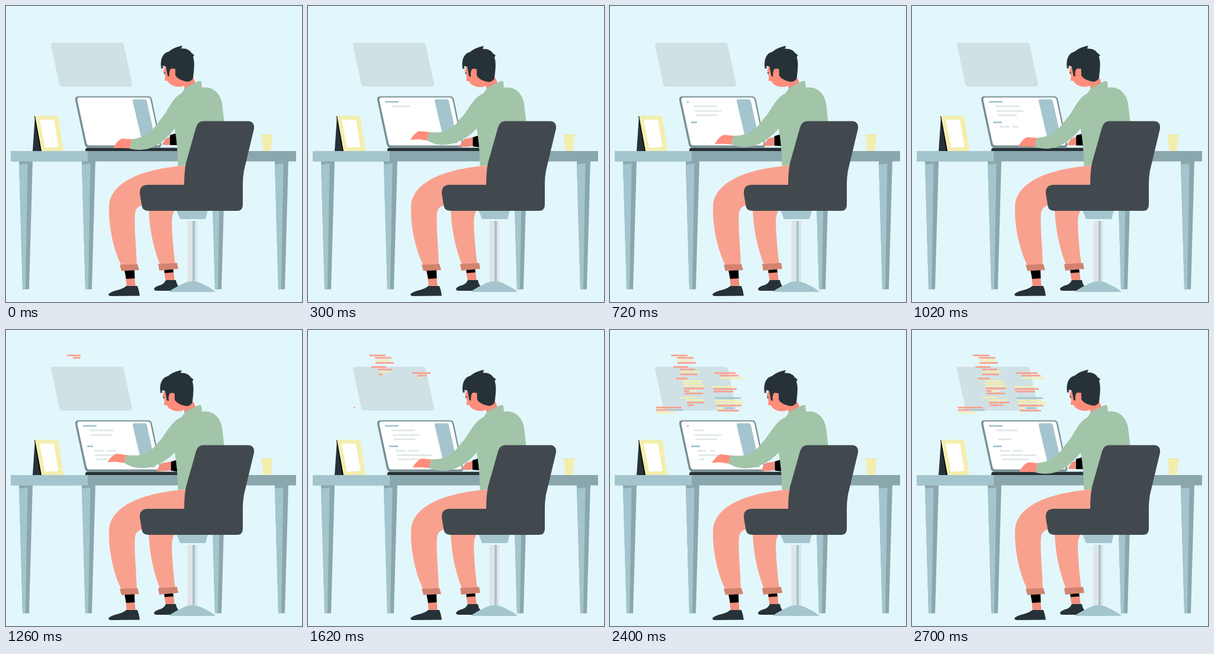
Write an HTML page with a canvas that moves like this. It is 500 by 500 pixels and loops after 2.73 s.

```html
<!DOCTYPE html>
<html lang="en">
<head>
<meta charset="utf-8">
<title>Working at a desk</title>
<style>
html, body { margin: 0; width: 100%; height: 100%; overflow: hidden; background: #e2f7fb; }
canvas { display: block; width: 500px; height: 500px; }
</style>
</head>
<body>
<canvas id="stage" width="500" height="500"></canvas>
<script>
const ctx = document.getElementById('stage').getContext('2d');
const LOOP = 2730;
const BLUE = '#a4c5cd', SLATE = '#8ba7ae', DARK = '#263238', CHAIR = '#41494e',
  SKIN = '#ff8d7b', SHADE = '#f28d7c', TROUSER = '#f9a18f', CUFF = '#d2836f',
  SAGE = '#a2c4a9', YELLOW = '#f4eeae', GREY = '#e0e8ea';
const inks = { p: TROUSER, y: YELLOW, b: BLUE };

const clamp = v => Math.max(0, Math.min(1, v));

function fill(color, d) {
  ctx.fillStyle = color;
  ctx.fill(new Path2D(d));
}

// Blend two paths that share the same commands.
function mix(a, b, u) {
  const target = b.match(/-?[\d.]+/g);
  let i = 0;
  return a.replace(/-?[\d.]+/g, n => +n + (target[i++] - n) * u);
}

// Linear interpolation over [time, value, time, value, ...].
function track(keys, t) {
  if (t <= keys[0]) return keys[1];
  for (let i = 2; i < keys.length; i += 2) {
    if (t < keys[i]) {
      const k = (t - keys[i - 2]) / (keys[i] - keys[i - 2]);
      return keys[i - 1] + (keys[i + 1] - keys[i - 1]) * k;
    }
  }
  return keys[keys.length - 1];
}

// Lines on the laptop: x, y, width, colour, growth keys
const screenLines = [
  [130, 162, 23, BLUE, [0, 0, 240, 1, 540, 1, 720, .12, 900, 1, 2220, 1, 2400, .12, 2600, 1]],
  [141, 169.5, 40, GREY, [120, 0, 350, 1, 2250, 1, 2400, .42, 2700, .94]],
  [143, 177.5, 45, GREY, [300, 0, 500, 1, 1100, 1, 1260, .78, 1450, 1, 1750, 1, 1950, .12, 2150, 1, 2420, 1, 2620, 0]],
  [145, 184.5, 36, GREY, [400, 0, 600, 1, 1000, 1, 1200, 0, 1300, 0, 1500, 1, 1800, 1, 1950, .42, 2100, 1, 2550, 1, 2700, .67]],
  [137, 196.5, 15, BLUE, [600, 0, 720, .67, 800, 1, 1150, 1, 1260, .67, 1400, 1]],
  [148, 204, 17, GREY, [800, 0, 1000, 1, 2300, 1, 2400, .88, 2500, 1]],
  [169.5, 204, 17.5, GREY, [900, 0, 1100, 1, 2250, 1, 2400, .47, 2550, 1]],
  [150, 211.5, 60, GREY, [1100, 0, 1260, .58, 1400, 1, 2250, 1, 2400, .62, 2550, 1]],
  [152, 218.5, 45, GREY, [1180, 0, 1260, .44, 1400, 1, 2200, 1, 2400, .15, 2600, 1]]
];

// Floating code: rows of y, x, then segments of ink and width
const blocks = [
  { start: 1110, rows: [
    [43, 103, 'p28'], [47, 113, 'p28'], [51, 114, 'y25'], [55.5, 114, 'p31'],
    [62.5, 107, 'p25'], [66.7, 118, 'p10 p15'], [71, 120, 'y31'], [75, 119, 'p28'],
    [82, 111, 'p20'], [86.3, 123, 'y33'], [90.5, 123, 'y16 y15'], [94.5, 124, 'y36'],
    [98.7, 124, 'p35'], [103, 125, 'p9 y12'], [107.2, 126, 'p31'], [114, 118, 'y25'],
    [118.3, 129, 'y31'], [122.6, 130, 'p17 p17'], [127, 131, 'p23']] },
  { start: 1463, rows: [
    [72.7, 176, 'p36'], [77, 185, 'p32'], [81.3, 186, 'y39'], [95.7, 173, 'y18 y15'],
    [99.7, 174, 'p40'], [104, 175, 'p33'], [115, 177, 'b44'], [119.2, 178, 'y19 y21'],
    [123.5, 178, 'y49'], [127.7, 180, 'p42'], [132, 181, 'y11 b16'], [136.2, 182, 'p36']] },
  { start: 1610, rows: [[131, 77, 'p43'], [135.2, 78, 'p21 b23'], [139.5, 79, 'y30']] }
];

function drawCode(t) {
  for (const { start, rows } of blocks) {
    rows.forEach(([y, x, text], i) => {
      const parts = text.split(' ').map(s => [inks[s[0]], +s.slice(1)]);
      const total = parts.reduce((sum, part) => sum + part[1] + 1, -1);
      let left = total * clamp((t - start - i * 67) / 185);
      for (const [ink, width] of parts) {
        ctx.fillStyle = ink;
        ctx.fillRect(x, y - 1.4, Math.max(0, Math.min(width, left)), 2.8);
        x += width + 1;
        left -= width + 1;
      }
    });
  }
}

function drawDesk() {
  for (const x of [22, 128, 347, 454]) {
    fill(SLATE, `M${x} 262h23l-6 216.500h-11z`);
    fill(BLUE, `M${x} 268l14.500-2l-3.500 212.500h-5z`);
  }
  fill(SLATE, 'M8 245H490V262.500H8z');
  fill(BLUE, 'M8 245H138V262.500H8z');
  fill(DARK, 'M49 186L60 245H45z');
  fill('#000', 'M48 186H50L61 245H58z');
  fill(YELLOW, 'M49 185.500H86Q88 185.500 88.500 188L97 245H60z');
  fill('#fff', 'M57 192H81L88.500 238L66 239.500z');
  fill(YELLOW, 'M431.500 217.500H450.500L447.500 245H434.500z');
  fill('#e9dfa4', 'M431.500 217H450.500V218H431.500z');
}

function drawLaptop(t) {
  fill('#789095', 'M122 152.500H240Q245 152.500 246.500 158L262 233Q263 239 258 239H139Q134 239 133 234L117 159Q116 152.500 122 152.500z');
  fill('#fff', 'M124 154.500H239Q243 154.500 244 158L259.500 231Q260 235.500 257 235.500H141Q137 235.500 136 231L120.500 159Q120 154.500 124 154.500z');
  fill(BLUE, 'M217 157.500H234Q237 157.500 238 161L253 229Q253 232 250 232H234Q231 232 230 229L214 161Q213.500 157.500 217 157.500z');
  for (const [x, y, width, color, keys] of screenLines) {
    ctx.fillStyle = color;
    ctx.fillRect(x, y - 1.4, width * track(keys, t), 2.8);
  }
  fill(DARK, 'M138 239.500H292V245H134V243Q134 239.500 138 239.500z');
}

function drawLegs() {
  fill(SHADE, 'M267 448H283L285 466L270 466z');
  fill('#000', 'M267 445L282 444L283 450L268 451z');
  fill(DARK, 'M250 478Q251 474 262 471Q268 468 270 463H287Q288 470 292 474L277 481H255Q250 481 250 478z');
  fill(TROUSER, 'M241 340H288Q280 350 280 364Q281 400 286 437H260Q242 390 241 340z');
  fill(CUFF, 'M257 436L289 434L291 444L259 447z');
  fill(SHADE, 'M202 456H217L219 476H204z');
  fill('#000', 'M200 446H217L217.500 460L203 461z');
  fill(DARK, 'M173 487Q176 483 188 480Q199 477 203 473H222Q225 481 226 489.500L178 490Q173 490 173 487z');
  fill(TROUSER, 'M304 269.500C250 273 175 290 174 340C173 375 183 415 195 438H221C220 400 216 370 218 350C219 340 226 337 234 336L304 320z');
  fill(CUFF, 'M192 437L222 436L225 446L195 447.500z');
}

function drawChair() {
  fill(BLUE, 'M288 345H341L337 360H294z');
  fill('#e0e4e6', 'M306.500 363H323V470H306.500z');
  fill(BLUE, 'M315 363H319V470H315z');
  fill(BLUE, 'M275 483Q280 478 297 470Q315 460 333 470Q350 478 354 483z');
  fill(CHAIR, 'M333 194.500H409Q420 195 419 207L402 278Q400 290 400 300V336Q400 346 390 346H241Q231 346 229.500 338L226 317Q225 302 240 302H301Q301 280 304 265L321 205Q324 194.500 333 194.500z');
}

function drawHead(u) {
  fill(SHADE, 'M299 122H317L320 130L302 143z');
  ctx.save();
  ctx.translate(-1.4 * u, .8 * u);
  fill(SKIN, 'M270 98L266 109L269 119L268 126L273 126.500Q275 132 283 135Q292 138 300 135L315 126L300 95z');
  fill(DARK, 'M262 104C260 90 265 79 275 77C282 71 289 69 298 67L296 72C304 71 311 75 313 79L318 83L316 86C319 95 318 105 316 122Q311 130 302 127Q290 124 286 117V106H278L276 119L273 118L270 102L265 101L262 107z');
  fill(SKIN, 'M276 118C275 109 278 105 282 105.500C286 107 287 113 285.500 118L282 122z');
  fill(DARK, 'M262.500 104L265.500 102L265 106zM266.500 111L269 113L267 115z');
  ctx.restore();
}

function drawFarHand(u) {
  fill(SHADE, mix('M279 220L270 224L266 230L263 234L272 235L279 234z',
    'M281 222L262 225L257 231L253 239L266 239L281 237z', u));
  fill('#000', mix('M277 218L291 214L291 235L277 235z', 'M279 223L291 219L291 240L279 238z', u));
}

function drawBody(u) {
  fill(SAGE, 'M296 148L303 138L325 127Q329 126 330 128L331 138C350 135 362 148 365 165L369 200L330 230L304 269L290.500 270.500Q290 235 285 207L283 175z');
  fill(SAGE, mix('M299 147C283 150 272 180 264 188C250 205 243 222 212 225L209 241C240 248 262 236 285 207L302 175z',
    'M299 147C280 150 268 180 256 190C244 205 235 214 202 209L198 222C218 238 255 237 285 207L302 175z', u));
  fill(SKIN, mix('M212 225L196 224Q188 227 181 240L193 240L209 240.500z',
    'M202 209L185 207Q178 209 170 221L185 220L198 222.500z', u));
}

function draw(t) {
  // Three reaches of the hands per loop
  const u = (1 - Math.cos(t / LOOP * 6 * Math.PI)) / 2;
  ctx.fillStyle = '#e2f7fb';
  ctx.fillRect(0, 0, 500, 500);
  fill('#d0e1e5', 'M80 62H194Q198 62 199 66L213 132Q213.500 136 210 136H95Q91 136 90 132L76 66Q75.500 62 80 62z');
  drawCode(t);
  drawDesk();
  drawLaptop(t);
  drawFarHand(u);
  drawLegs();
  drawHead(u);
  drawBody(u);
  drawChair();
}

function tick() {
  draw(performance.now() % LOOP);
  requestAnimationFrame(tick);
}
tick();
</script>
</body>
</html>
```
